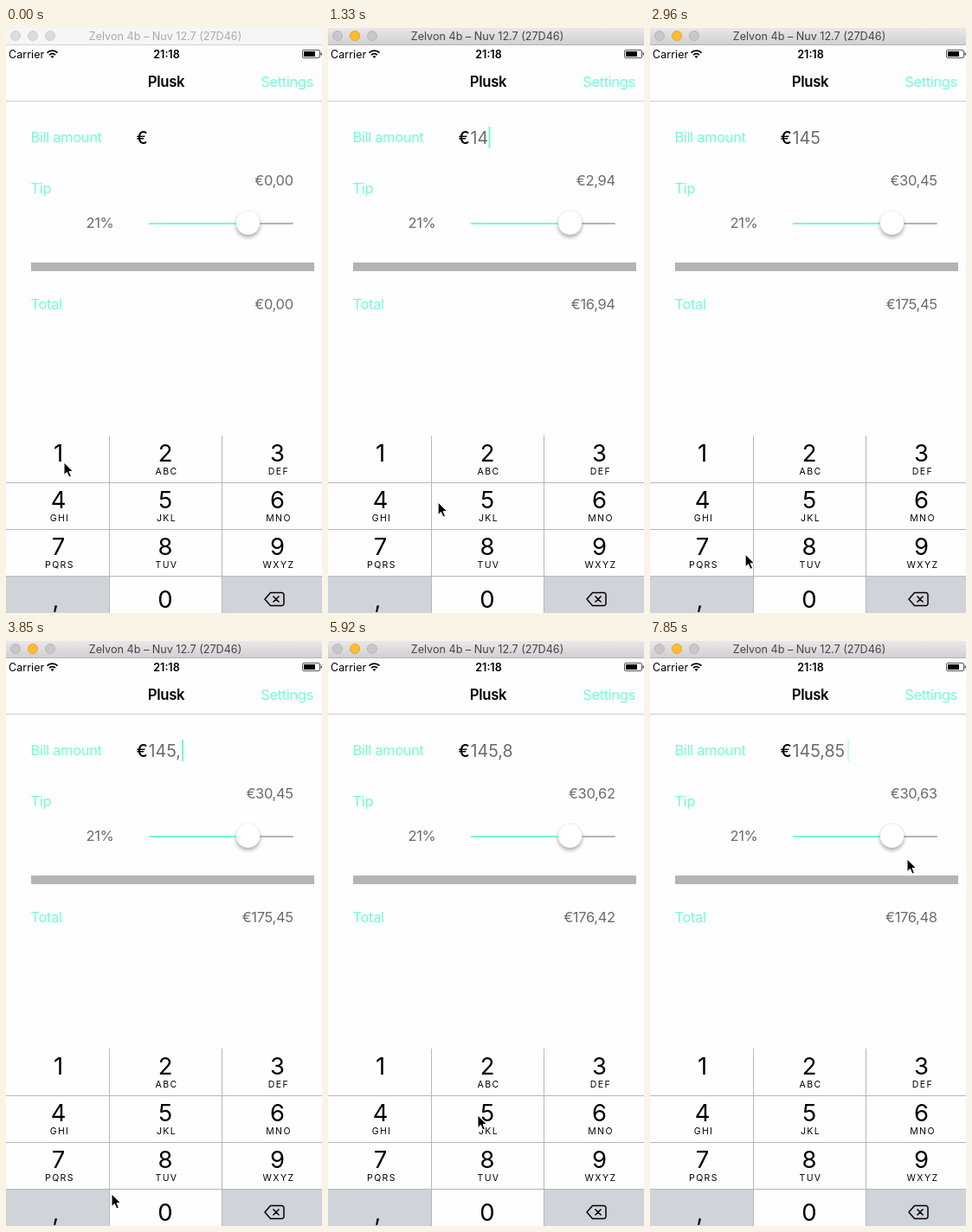
These frames come from a looping animation (365x676 px, 8 s). An HTML page:

```html
<!DOCTYPE html>
<html lang="en">
<head>
<meta charset="utf-8">
<title>Tip calculator</title>
<style>
  html, body { margin: 0; width: 100%; height: 100%; overflow: hidden; background: #fefefe; }
  svg { display: block; font-family: Inter, Roboto, sans-serif; }
  text { white-space: pre; }
  .body { font-size: 16.5px; letter-spacing: -.35px; }
  .mint { fill: #73fcd6; }
  .grey { fill: #6c6c6c; }
  .end { text-anchor: end; }
  .mid { text-anchor: middle; }
  .digit { font-size: 27.4px; }
  .letters { font-size: 10.5px; letter-spacing: 1.4px; }
  .input { font-size: 19.6px; }
</style>
</head>
<body>
<svg width="365" height="676" viewBox="0 0 365 676">
  <defs>
    <linearGradient id="chrome" x2="0" y2="1">
      <stop stop-color="#e9e7e9"/><stop offset="1" stop-color="#d2d0d2"/>
    </linearGradient>
    <filter id="soft" x="-50%" y="-50%" width="200%" height="200%">
      <feGaussianBlur stdDeviation="2"/>
    </filter>
  </defs>
  <rect width="365" height="676" fill="#fefefe"/>

  <rect id="bar" width="365" height="19"/>
  <rect id="barLine" y="19" width="365" height="1"/>
  <g id="lights" stroke-width="1">
    <circle cx="11" cy="9" r="5.5"/><circle cx="31" cy="9" r="5.5"/><circle cx="51" cy="9" r="5.5"/>
  </g>
  <text id="title" class="mid" x="184" y="14" font-size="12.6">Zelvon 4b – Nuv 12.7 (27D46)</text>

  <text x="3" y="34.5" font-size="12.4" letter-spacing=".1">Carrier</text>
  <g fill="none" stroke="#000" stroke-width="1.8">
    <path d="M47.5 28.6a8.5 8.5 0 0 1 12 0M50 31.2a5 5 0 0 1 7 0"/>
    <path d="M53.5 35l-2-2.2a3 3 0 0 1 4 0z" fill="#000" stroke="none"/>
  </g>
  <text class="mid" x="185.5" y="34.5" font-size="12.5" font-weight="600">21:18</text>
  <rect x="342.5" y="25.5" width="20" height="9" rx="1.5" fill="none" stroke="#555"/>
  <rect x="344" y="27" width="13" height="6"/>
  <rect x="363.5" y="28.5" width="1.5" height="3" fill="#555"/>

  <text class="mid" x="185" y="68" font-size="16.7" font-weight="600" letter-spacing="-.3">Plusk</text>
  <text class="body mint end" x="355" y="68">Settings</text>
  <rect y="84" width="365" height="1" fill="#cfcfcf"/>

  <text class="body mint" x="28.5" y="132">Bill amount</text>
  <text class="input" x="150.5" y="133.5" font-weight="500">€</text>
  <text id="bill" class="input grey" x="164.5" y="133.5"></text>
  <rect id="caret" class="mint" y="114" width="2" height="25"/>
  <text class="body mint" x="28.5" y="191">Tip</text>
  <text id="tip" class="body grey end" x="331.7" y="182"></text>
  <text class="body grey" x="92.5" y="231">21%</text>
  <rect x="165" y="225" width="167" height="2" rx="1" fill="#b5b5b5"/>
  <rect x="165" y="225" width="115" height="2" rx="1" class="mint"/>
  <circle cx="279.5" cy="228" r="14" opacity=".3" filter="url(#soft)"/>
  <circle cx="279.5" cy="225" r="14" fill="#fff" stroke="#000" stroke-opacity=".1" stroke-width=".6"/>
  <rect x="29" y="271" width="327" height="10" fill="#b4b4b4"/>
  <text class="body mint" x="28.5" y="325">Total</text>
  <text id="total" class="body grey end" x="331.7" y="325"></text>

  <g id="pad"></g>
  <path d="M305.5 652.5H318.500a2.500 2.500 0 0 1 2.500 2.500V665a2.500 2.500 0 0 1-2.500 2.500H305.500L299 660z M308.500 656.500l7 7m0-7l-7 7"
        fill="none" stroke="#000" stroke-width="1.500" stroke-linejoin="round"/>

  <path id="cursor" d="M0 0V14.500L3.400 11.400L5.800 17L8.400 15.900L6 10.400H10.500Z"
        fill="#000" stroke="#fff" stroke-width="1" stroke-linejoin="round"/>
</svg>
<script>
const LOOP = 8000, ACTIVE_AT = 150, BLINK = 1040;
const $ = id => document.getElementById(id);

// Screen refreshes: start, end, count
const RUNS = [[0, 0, 1], [150, 290, 2], [590, 1620, 8], [1920, 2220, 3], [2660, 3700, 8],
  [3850, 4450, 5], [4890, 5920, 8], [6070, 6370, 3], [6810, 6960, 2], [7410, 7850, 4]];

// Cursor tip: time, x, y
const PATH = [[0, 67, 502], [590, 67, 502], [735, 67, 537], [884, 66, 547], [1031, 66, 547],
  [1600, 184, 549], [2550, 184, 549], [3250, 57, 651], [3700, 57, 651], [3850, 122, 639],
  [4300, 192, 608], [5030, 192, 608], [5330, 140, 621], [5480, 101, 602], [5630, 118, 575],
  [5900, 173, 548], [7290, 173, 548], [7850, 297, 252]];

// Entry: time, text, caret x
const TYPED = [[0, '', 164], [590, '1', 173], [880, '14', 185.5], [2070, '145', 198],
  [3700, '145,', 203], [4890, '145,8', 215.5], [6220, '145,85', 228]];

// Key held: label, from, to
const HELD = [['1', 290, 730], ['4', 880, 1030], ['5', 1920, 2220],
  [',', 3550, 3850], ['8', 4890, 5030], ['5', 6070, 6370]];

const KEYS = [['1', ''], ['2', 'ABC'], ['3', 'DEF'], ['4', 'GHI'], ['5', 'JKL'], ['6', 'MNO'],
  ['7', 'PQRS'], ['8', 'TUV'], ['9', 'WXYZ'], [',', ''], ['0', ''], ['del', '']];
const PLAIN = '#fefefe', SHADE = '#d0d3da';
const faces = {};

function add(name, attrs, text = '') {
  const el = document.createElementNS('http://www.w3.org/2000/svg', name);
  for (const k in attrs) el.setAttribute(k, attrs[k]);
  el.textContent = text;
  $('pad').append(el);
  return el;
}

function buildPad() {
  const left = [0, 120, 250], mid = [60.5, 184, 313.5];
  KEYS.forEach(([label, letters], i) => {
    const c = i % 3, r = Math.floor(i / 3), y = 471 + r * 54;
    const dark = label === ',' || label === 'del';
    const rect = add('rect', { x: left[c], y, width: 130, height: 54 });
    faces[label] = { rect, dark };
    if (label === 'del') return;
    const x = label === ',' ? 57.5 : mid[c];
    add('text', { class: 'digit mid', x, y: y + (r < 3 ? 29.5 : 36.5) }, label);
    add('text', { class: 'letters mid', x: mid[c] + 1.5, y: y + 45 }, letters);
  });
  const line = { fill: '#b5b7bc' };
  for (const x of [119, 249]) add('rect', { ...line, x, y: 471, width: 1, height: 205 });
  for (const y of [525, 579, 633]) add('rect', { ...line, x: 0, y, width: 365, height: 1 });
}

function refresh(t) {
  const [a, b, n] = RUNS.findLast(r => r[0] <= t);
  if (n < 2) return a;
  const step = (b - a) / (n - 1);
  return a + step * Math.min(n - 1, Math.floor((t - a) / step + .03));
}

function pointer(t) {
  const i = PATH.findLastIndex(p => p[0] <= t);
  const p = PATH[i], q = PATH[i + 1] || p;
  const k = q === p ? 0 : (t - p[0]) / (q[0] - p[0]);
  return [p[1] + (q[1] - p[1]) * k, p[2] + (q[2] - p[2]) * k];
}

const money = v => '€' + (Math.round(v * 100) / 100).toFixed(2).replace('.', ',');

function drawWindow(active) {
  $('bar').setAttribute('fill', active ? 'url(#chrome)' : '#f6f6f6');
  $('barLine').setAttribute('fill', active ? '#b5b3b5' : '#d5d5d5');
  $('title').setAttribute('fill', active ? '#444' : '#aaa');
  [...$('lights').children].forEach((dot, i) => {
    const lit = active && i === 1;
    dot.setAttribute('fill', lit ? '#fdbc31' : active ? '#c9c7c9' : '#dcdcdc');
    dot.setAttribute('stroke', lit ? '#e5a62d' : active ? '#b8b6b8' : '#d0d0d0');
  });
}

function draw(now) {
  const t = refresh(now % LOOP);
  drawWindow(t >= ACTIVE_AT);

  const [since, text, caretX] = TYPED.findLast(e => e[0] <= t);
  const amount = parseFloat(text.replace(',', '.')) || 0;
  $('bill').textContent = text;
  $('tip').textContent = money(amount * .21);
  $('total').textContent = money(amount * 1.21);

  const phase = (t - since) % BLINK;
  $('caret').setAttribute('x', caretX);
  $('caret').setAttribute('opacity', !text || phase >= 700 ? 0 : phase < 560 ? 1 : .45);

  const held = HELD.find(h => t >= h[1] && t < h[2]);
  for (const label in faces) {
    const { rect, dark } = faces[label];
    const down = !!held && held[0] === label;
    rect.setAttribute('fill', dark !== down ? SHADE : PLAIN);
  }
  $('cursor').setAttribute('transform', `translate(${pointer(t)})`);
}

buildPad();
const start = performance.now();
function tick() {
  draw(performance.now() - start);
  requestAnimationFrame(tick);
}
tick();
</script>
</body>
</html>
```
